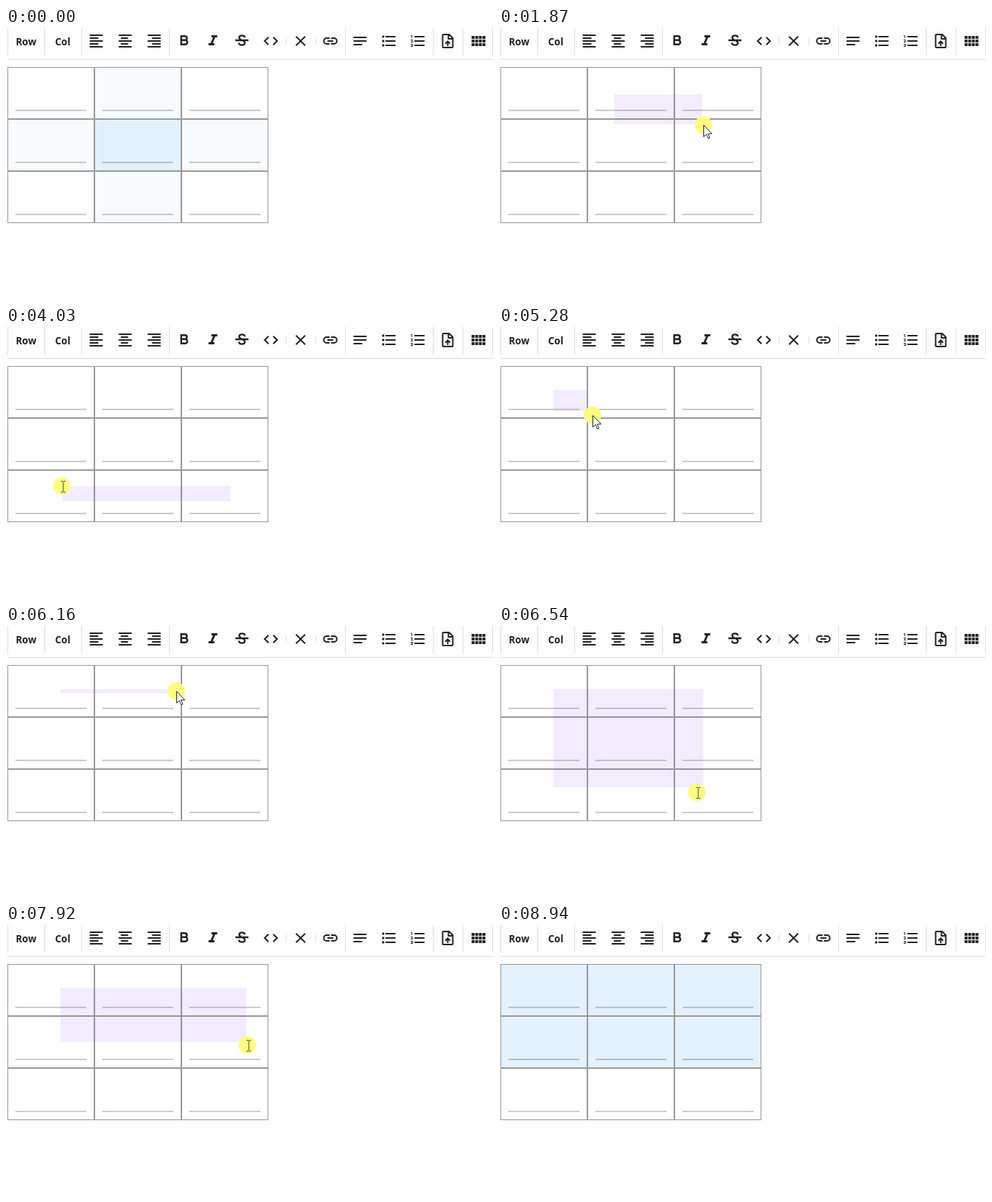
An HTML page for the animation above (9.69 s loop, 672 by 375 pixels).

```html
<!DOCTYPE html>
<html lang="en">
<head>
<meta charset="utf-8">
<title>Table selection</title>
<style>
html, body { margin: 0; width: 100%; height: 100%; overflow: hidden; background: #fefefe; }
svg { display: block; }
text { font: 700 13.4px "Open Sans", "Noto Sans", sans-serif; text-anchor: middle; fill: #212121; }
</style>
</head>
<body>
<svg id="stage" width="672" height="375" viewBox="0 0 672 375">
  <g id="bar"><text x="27.7" y="24">Row</text><text x="78.3" y="24">Col</text></g>
  <g id="table"></g>
  <rect id="area" fill="rgba(118,85,245,.1)"/>
  <g id="pointer">
    <circle r="12" fill="#fffc80"/>
    <path id="arrow" d="M.5.5v16l3.7-3.5 2.6 6 2.2-1-2.5-5.7h5.2z" fill="#fff" stroke="#222"/>
    <path id="beam" d="M-1-6.5h2.5m1 0h2.5M2-6v14M-1 8.5h2.5m1 0h2.5" fill="none" stroke="#444"/>
  </g>
</svg>
<script>
const $ = id => document.getElementById(id);
const show = (id, on) => $(id).style.display = on ? "" : "none";

function set(el, attrs) {
  for (const k in attrs) el.setAttribute(k, attrs[k]);
}
function add(parent, tag, attrs) {
  const el = document.createElementNS("http://www.w3.org/2000/svg", tag);
  set(el, attrs);
  parent.append(el);
  return el;
}
const box = (parent, x, y, width, height, fill) =>
  add(parent, "rect", { x, y, width, height, fill });

// Toolbar icons: stroked paths on a 24px grid, placed by centre x
function icon(cx, d, width = 2) {
  add($("bar"), "path", {
    d, transform: `translate(${cx - 12.5} 6)`,
    fill: "none", stroke: "#212121", "stroke-width": width
  });
}
const dash = (x, y, w) => `M${x} ${y}h${w}`;
const range = n => [...Array(n).keys()];

[0, 3, 6].forEach((indent, i) =>
  icon(125 + 40 * i, range(5).map(r => r % 2 ? dash(3 + indent, 4 + 4 * r, i === 1 ? 10 : 12) : dash(3, 4 + 4 * r, 18)).join("")));
icon(246, "M8.3 5.2h5a2.7 2.7 0 0 1 0 5.6h-5zm0 5.6h5.4a3 3 0 0 1 0 6h-5.4z", 2.5);
icon(286, "M10 5.5h8M6 16.5h8M14.4 5.5L9.6 16.5", 2.9);
icon(326, "M16 7.2q0-2.9-3.8-2.9t-3.9 2.9q0 1.9 2.7 2.8M3 11h18M13.5 12q2.6.8 2.6 2.6 0 3.1-4 3.1t-4.2-3.3", 2.3);
icon(366, "M8.7 6.7L3.4 12l5.3 5.3M15.3 6.7l5.3 5.3-5.3 5.3");
icon(407, "M5.7 5.7l12.6 12.6M18.3 5.7L5.7 18.3");
icon(448, "M11 8H7a4 4 0 0 0 0 8h4M13 8h4a4 4 0 0 1 0 8h-4M8 12h8");
icon(489, dash(3, 7, 18) + dash(3, 12, 18) + dash(3, 17, 12));
for (const cx of [529, 569]) icon(cx, range(3).map(r => dash(7, 6 + 6 * r, 14)).join(""));
icon(529, range(3).map(r => dash(2.6, 6 + 6 * r, 2.8)).join(""), 2.8);
icon(569, "M2 4.5h1.5V8M2 10.5h2.5v.5l-2 2.5h2.5M2 16.5h2.5v3H2M3 18h1.5", 1);
icon(610, "M14 3H6q-1 0-1 1v16q0 1 1 1h12q1 0 1-1V8zM13 3v6h6M12 19v-6M8.7 15.7l3.3-3.3 3.3 3.3");
icon(652, range(12).map(i => dash(3 + 5 * (i % 4), 7 + 5 * Math.floor(i / 4), 4)).join(""), 4);

for (const x of [2, 53, 104, 225, 468, 589, 630, 671]) box($("bar"), x, 0, 1, 38, "#e0e0e0");
for (const x of [386, 427]) box($("bar"), x, 13, 1, 10, "#e0e0e0");
box($("bar"), 2, 43, 670, 1, "#e0e0e0");

// Table of 3 by 3 cells
const LEFT = 2, TOP = 54, W = 120, H = 72;
const col = x => Math.floor((x - LEFT) / W), row = y => Math.floor((y - TOP) / H);
const cells = range(9).map(i => {
  const c = i % 3, r = Math.floor(i / 3), x = LEFT + c * W, y = TOP + r * H;
  const el = box($("table"), x + .5, y + .5, W - 1, H - 1, "#fff");
  el.setAttribute("stroke", "#999");
  box($("table"), x + 11, y + 59, 98, 2, "rgba(0,0,0,.2)");
  return { el, c, r };
});

// Pointer moves: first step, last step, end point
const moves = [
  [1, 7, 159, 92], [12, 15, 282, 134], [15, 19, 310, 179], [20, 23, 310, 241], [26, 32, 77, 220],
  [33, 38, 75, 87], [41, 46, 225, 183], [47, 49, 235, 90], [63, 67, 316, 178], [69, 70, 499, 304]
];
// Drags: first step, release step, step that clears the highlight
const drags = [[13, 18, 27], [27, 34, 42], [42, 64, 99]];
const LOOP = 9690, STEP = 125.8, FOCUS_END = 11, LAST = 70;

// Between two moves the pointer circles over the table
function lap(n) {
  const deg = n < 55 ? -74 + (n - 49) / 6 * 260 : 186 + (n - 55) / 8 * 175;
  const a = deg * Math.PI / 180;
  return { x: 197 + 136 * Math.cos(a), y: 165 + 79 * Math.sin(a) };
}

function pointerAt(n) {
  if (n > 49 && n <= 63) return lap(n);
  let p = { x: 532, y: 363 };
  for (const [from, to, x, y] of moves) {
    if (n <= from) break;
    if (from === 63) p = lap(from);
    const rest = (1 - Math.min(1, (n - from) / (to - from))) ** 2;
    p = { x: x + (p.x - x) * rest, y: y + (p.y - y) * rest };
  }
  return p;
}

function span(a, b) {
  const x = Math.round(Math.min(a.x, b.x)), y = Math.round(Math.min(a.y, b.y));
  return { x, y, width: Math.round(Math.max(a.x, b.x)) - x, height: Math.round(Math.max(a.y, b.y)) - y };
}

function cellFill(n, drag, { c, r }) {
  if (n < FOCUS_END) return c === 1 && r === 1 ? "#e3f1fd" : c === 1 || r === 1 ? "#f7fbfe" : "#fff";
  if (!drag || n < drag[1]) return "#fff";
  const s = span(pointerAt(drag[0] - 1), pointerAt(drag[1] - 1));
  const inside = c >= col(s.x) && c <= col(s.x + s.width) && r >= row(s.y) && r <= row(s.y + s.height);
  return inside ? "#e3f1fd" : "#fff";
}

function draw(time) {
  const n = Math.floor(time % LOOP / STEP + .15);
  const drag = drags.find(([from, , end]) => n >= from && n < end);
  const dragging = drag && n < drag[1];
  for (const cell of cells) cell.el.setAttribute("fill", cellFill(n, drag, cell));

  const p = pointerAt(n), x = Math.round(p.x), y = Math.round(p.y);
  const u = (x - LEFT) % W, v = (y - TOP) % H;
  const overText = col(x) < 3 && row(y) < 3 && u > 11 && u < 109 && v > 11 && v < 53;
  set($("pointer"), { transform: `translate(${x} ${y})` });
  show("pointer", n >= 1 && n <= LAST);
  show("beam", overText);
  show("arrow", !overText);

  show("area", dragging);
  if (dragging) {
    // The dragged corner trails the pointer a little
    const q = pointerAt(n - 1);
    const corner = { x: p.x + (q.x - p.x) * .15, y: p.y + (q.y - p.y) * .15 };
    set($("area"), span(pointerAt(drag[0] - 1), corner));
  }
}

const start = performance.now();
function tick() {
  draw(performance.now() - start);
  requestAnimationFrame(tick);
}
tick();
</script>
</body>
</html>
```
